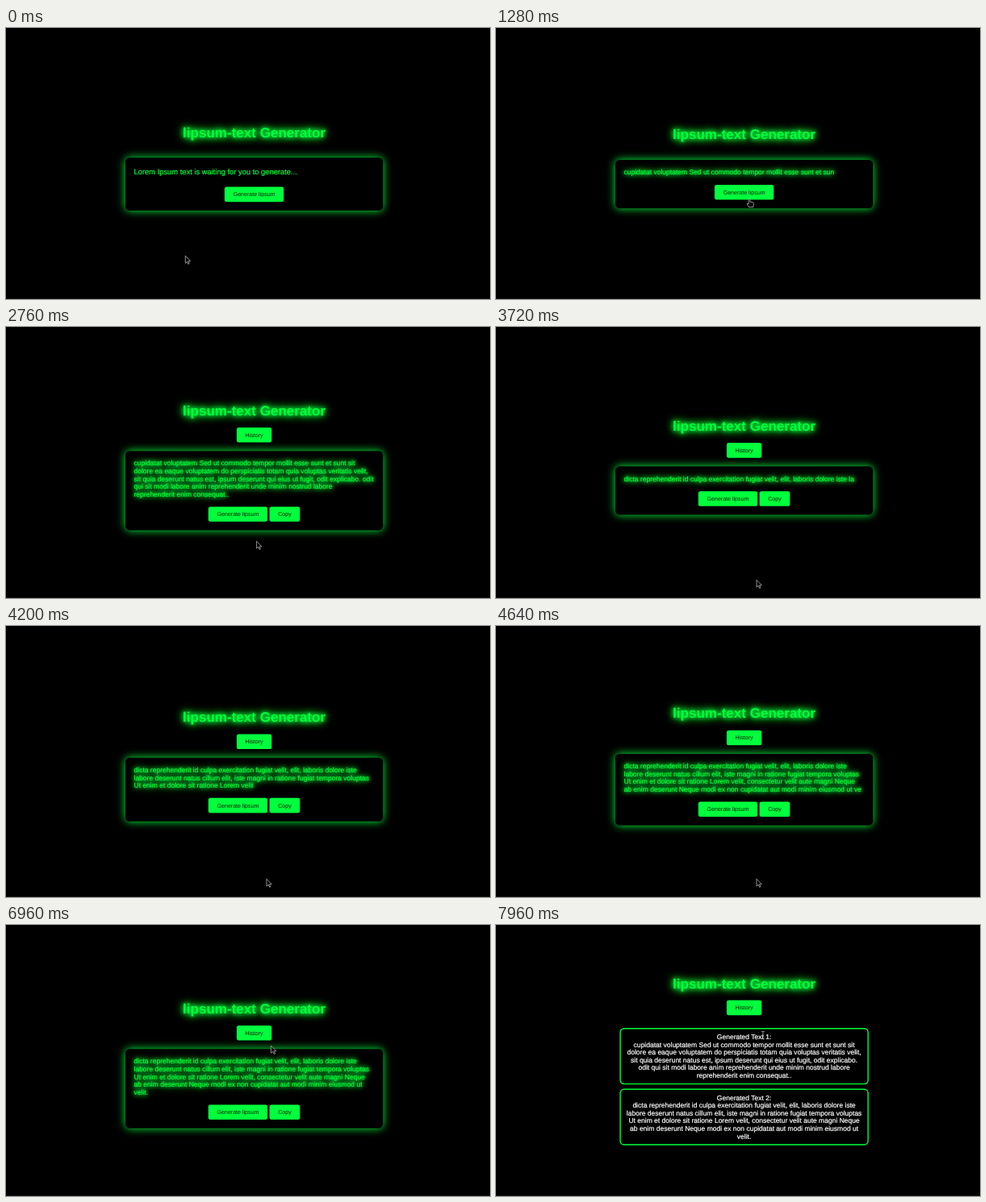
Recreate the animation shown at these times as an HTML page. Size 600 px wide and 337 px high, loop 8 s.

```html
<!DOCTYPE html>
<html lang="en">
<head>
<meta charset="utf-8">
<title>lipsum-text Generator</title>
<style>
html, body { margin: 0; width: 100%; height: 100%; overflow: hidden; background: #000; }
svg { display: block; width: 100vw; height: 100vh; }
text { font-family: "Liberation Sans", Arial, sans-serif; text-rendering: geometricPrecision; }
.body { stroke-width: .22px; }
</style>
</head>
<body>
<svg viewBox="0 0 600 337">
  <defs>
    <filter id="boxGlow" x="-20%" y="-60%" width="140%" height="220%">
      <feGaussianBlur stdDeviation="5.3"/>
    </filter>
    <filter id="titleGlow" x="-20%" y="-150%" width="140%" height="400%">
      <feGaussianBlur in="SourceGraphic" stdDeviation="5.3" result="wide"/>
      <feGaussianBlur in="SourceGraphic" stdDeviation="2.7" result="near"/>
      <feMerge>
        <feMergeNode in="wide"/><feMergeNode in="wide"/>
        <feMergeNode in="near"/><feMergeNode in="SourceGraphic"/>
      </feMerge>
    </filter>
    <filter id="textGlow" filterUnits="userSpaceOnUse" x="130" y="120" width="360" height="150">
      <feGaussianBlur in="SourceGraphic" stdDeviation="4.5" result="wide"/>
      <feGaussianBlur in="SourceGraphic" stdDeviation="2.7" result="near"/>
      <feMerge><feMergeNode in="wide"/><feMergeNode in="near"/><feMergeNode in="SourceGraphic"/></feMerge>
    </filter>
  </defs>
  <rect width="600" height="337"/>
  <rect y="336" width="600" height="1" fill="#101010"/>
  <g id="page"></g>
  <g id="cursor"></g>
</svg>
<script>
const LOOP = 8000, GREEN = '#00ff3c';
const S = 0.5325;                 // page px to stage px
const CX = 307.6, PAD = 20 * S, LINE = 18 * S, BTN_H = 35 * S;
const BOX_W = 600 * S, BOX_X = CX - BOX_W / 2;
const FONT = 16 * S, BTN_FONT = 13.333 * S;

const PROMPT = 'Lorem Ipsum text is waiting for you to generate...';
const TEXTS = [
  'cupidatat voluptatem Sed ut commodo tempor mollit esse sunt et sunt sit dolore ea eaque voluptatem do ' +
  'perspiciatis totam quia voluptas veritatis velit, sit quia deserunt natus est, ipsum deserunt qui eius ' +
  'ut fugit, odit explicabo. odit qui sit modi labore anim reprehenderit unde minim nostrud labore ' +
  'reprehenderit enim consequat..',
  'dicta reprehenderit id culpa exercitation fugiat velit, elit, laboris dolore iste labore deserunt natus ' +
  'cillum elit, iste magni in ratione fugiat tempora voluptas Ut enim et dolore sit ratione Lorem velit, ' +
  'consectetur velit aute magni Neque ab enim deserunt Neque modi ex non cupidatat aut modi minim eiusmod ut velit.'
];

// Times in ms
const TYPE1 = 990, RATE1 = 0.2277, DONE1 = TYPE1 + TEXTS[0].length / RATE1;
const TYPE2 = 3384, RATE2 = 0.25;
const COPIED = 5920, RESTORED = 6920, HISTORY = 7400;

// Pointer moves: start, end, x, y
const START = [222.3, 283.3];
const MOVES = [
  [80, 820, 314, 212.5],
  [1320, 1700, 311.8, 270],
  [2640, 3260, 300, 233],
  [3420, 3690, 323, 314.5],
  [4960, 5500, 346, 237.5],
  [6320, 7150, 326, 137],
  [7450, 7800, 331, 137]
];

const SHAPES = {
  arrow: 'M0 0V9L2.1 7.1L3.6 10.3L4.9 9.7L3.5 6.6H6.4Z',
  hand: 'M-.9 .3Q0 -.8 .9 .3V3.6L4.8 4.5Q5.6 4.8 5.5 6L4.7 10.3H-.3L-2.8 6.6Q-3 5.4 -1.6 5.8L-.9 6.6Z',
  beam: 'M-1.8 -4.5H1.8M0 -4.5V4.5M-1.8 4.5H1.8'
};

const page = document.getElementById('page');
const cursor = document.getElementById('cursor');
const pen = document.createElement('canvas').getContext('2d');
pen.font = '16px "Liberation Sans", Arial, sans-serif';

function wrap(str, width) {
  const lines = [];
  let line = '';
  for (const word of str.split(' ')) {
    const next = line ? line + ' ' + word : word;
    if (line && pen.measureText(next).width > width) {
      lines.push(line);
      line = word;
    } else line = next;
  }
  return [...lines, line];
}

const text = (x, y, size, str, attrs = '') =>
  `<text x="${x}" y="${y.toFixed(2)}" font-size="${size}" ${attrs}>${str}</text>`;
const rect = (x, y, w, h, r, attrs) =>
  `<rect x="${x}" y="${y}" width="${w}" height="${h}" rx="${r}" ${attrs}/>`;
const textWidth = (str, px) => pen.measureText(str).width / 16 * px;
const bodyInk = color => `class="body" fill="${color}" stroke="${color}"`;

const isOver = (z, [x, y]) => x >= z.x && x <= z.x + z.w && y >= z.y && y <= z.y + z.h;

// Draws a centred row of buttons and records their hit areas
function buttons(labels, y, zones) {
  const gap = textWidth(' ', FONT);
  const widths = labels.map(l => textWidth(l, BTN_FONT) + 2 * PAD);
  let x = CX - (widths.reduce((a, b) => a + b) + gap * (labels.length - 1)) / 2;
  return labels.map((label, i) => {
    const w = widths[i], left = x;
    x += w + gap;
    zones.push({ x: left, y, w, h: BTN_H, shape: 'hand' });
    return rect(left, y, w, BTN_H, 5 * S, `fill="${GREEN}"`) +
      text(left + w / 2, y + 11.75, BTN_FONT, label, 'text-anchor="middle" fill="#000" fill-opacity=".9"');
  }).join('');
}

const title = y => text(CX, y, 32 * S, 'lipsum-text Generator',
  `text-anchor="middle" font-weight="bold" fill="${GREEN}" filter="url(#titleGlow)"`);

function generator(t, zones) {
  const waiting = t < TYPE1, full = t >= DONE1;
  const [str, from, rate] = t < TYPE2 ? [TEXTS[0], TYPE1, RATE1] : [TEXTS[1], TYPE2, RATE2];
  const shown = str.slice(0, Math.floor((t - from) * rate + 0.5));
  const lines = waiting ? [PROMPT] : wrap(shown, 560);
  const textH = waiting ? 28.2 * S : lines.length * LINE;
  const h = textH + BTN_H + 3 * PAD;
  const top = 194.1 + (full ? BTN_H / 2 : 0) - h / 2;
  const left = BOX_X + PAD, textTop = top + PAD;
  const histTop = top - PAD - BTN_H;

  let out = title(full ? histTop - 15.2 : top - 25.8);
  if (full) out += buttons(['History'], histTop, zones);
  out += rect(BOX_X, top, BOX_W, h, 10 * S, `fill="${GREEN}" filter="url(#boxGlow)"`);
  out += rect(BOX_X, top, BOX_W, h, 10 * S, 'fill="#000"');
  out += waiting
    ? text(left, textTop + 10.4, 17.6 * S, PROMPT, bodyInk(GREEN))
    : `<g ${bodyInk(GREEN)} filter="url(#textGlow)">` +
      lines.map((l, i) => text(left, textTop + 7.55 + i * LINE, FONT, l)).join('') + '</g>';
  zones.push({ x: left, y: textTop, w: BOX_W - 2 * PAD, h: textH, shape: 'beam' });

  const labels = ['Generate lipsum'];
  if (full) labels.push(t >= COPIED && t < RESTORED ? 'Copied!' : 'Copy');
  return out + buttons(labels, textTop + textH + PAD, zones);
}

function history(zones) {
  const w = 308.6, x = CX - w / 2, line = 2.6 * S;
  let top = 128, out = title(78.5) + buttons(['History'], 93.6, zones);
  TEXTS.forEach((str, n) => {
    const lines = [`Generated Text ${n + 1}:`, ...wrap(str, 555)];
    const h = lines.length * LINE + 24 * S;
    out += rect(x + line / 2, top + line / 2, w - line, h - line, 9 * S,
      `fill="#000" stroke="${GREEN}" stroke-width="${line}"`);
    out += `<g ${bodyInk('#fff')} text-anchor="middle">` + lines.map((l, i) =>
      text(CX, top + 12 * S + 7.6 + i * LINE, FONT, l)).join('') + '</g>';
    zones.push({ x, y: top + 12 * S, w, h: h - 24 * S, shape: 'beam' });
    top += h + 10 * S;
  });
  return out;
}

function pointer(t) {
  let pos = START;
  for (const [from, to, x, y] of MOVES) {
    if (t <= from) break;
    const p = Math.min(1, (t - from) / (to - from)), e = p * p * (3 - 2 * p);
    pos = [pos[0] + (x - pos[0]) * e, pos[1] + (y - pos[1]) * e];
  }
  return pos;
}

let last = '';
function draw(t) {
  const zones = [];
  const html = t < HISTORY ? generator(t, zones) : history(zones);
  if (html !== last) page.innerHTML = last = html;

  const pos = pointer(t);
  const zone = zones.find(z => isOver(z, pos));
  const shape = SHAPES[zone ? zone.shape : 'arrow'];
  cursor.innerHTML = `<path d="${shape}" transform="translate(${pos})" fill="#000" stroke="#ccc" stroke-width=".7" stroke-linejoin="round"/>`;
}

const begin = performance.now();
function tick() {
  draw((performance.now() - begin) % LOOP);
  requestAnimationFrame(tick);
}
tick();
</script>
</body>
</html>
```
